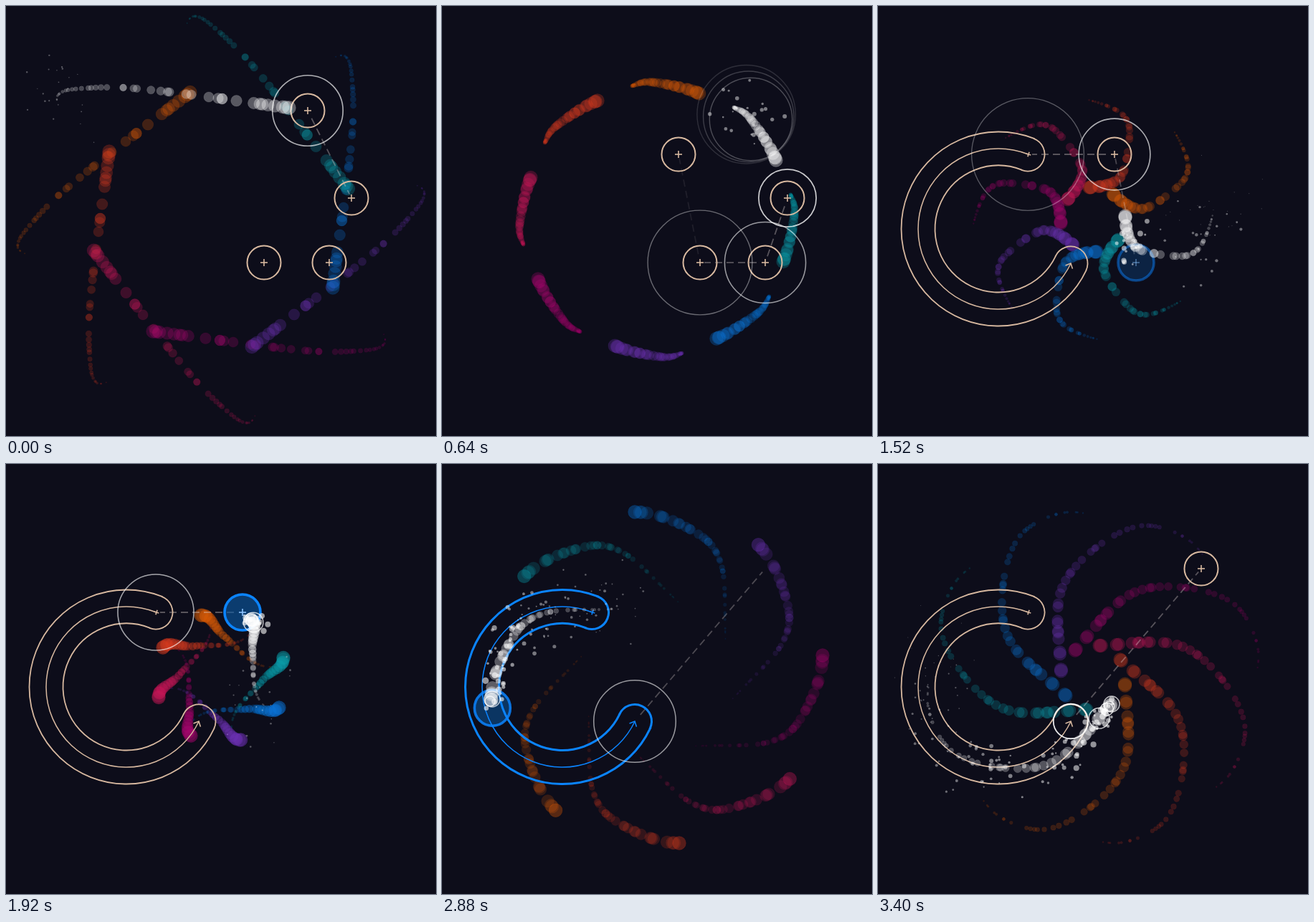
Animation of 600x600 px, one loop 3.44 s. Source, as an HTML page with a canvas:

```html
<!DOCTYPE html>
<html lang="en">
<head>
<meta charset="utf-8">
<title>Eight cursors</title>
<style>
  html, body { margin: 0; width: 100%; height: 100%; overflow: hidden; background: #0d0d1a; }
  canvas { display: block; width: 600px; height: 600px; }
</style>
</head>
<body>
<canvas id="stage" width="600" height="600"></canvas>
<script>
const g = document.getElementById('stage').getContext('2d');
const LOOP = 3440, STEP = 40, TRAIL = 570, R = 23.5, TAU = Math.PI * 2;
const CX = 300, CY = 298;
const BACK = '#0d0d1a', SAND = '#d8b9a0', BLUE = '#0b84ff';
const COLORS = ['#ffffff', '#0aa0ae', '#0a78dc', '#7034b8', '#a8066e', '#cc185a', '#dc3c20', '#dc5c08'];

// key points of the cursor path: time, x, y
const PATH = [
  [-600, 74, 143], [-520, 72, 125], [-430, 95, 116], [-280, 180, 115], [0, 395, 142],
  [200, 408, 142], [405, 431, 158], [640, 466, 215], [850, 472, 263], [1120, 452, 332],
  [1220, 425, 349], [1360, 358, 335], [1640, 344, 262], [1920, 342, 217], [2200, 277, 204],
  [2360, 225, 203], [2520, 144, 208], [2680, 100, 240], [2880, 69, 329], [3000, 100, 398],
  [3120, 175, 424], [3240, 250, 413], [3400, 325, 336], [3450, 340, 318]
];

// places to hit, in order; 5 and 6 are the ends of the slider
const HITS = [
  [421, 146, 405], [482, 268, 902], [451, 358, 1161], [360, 358, 1418],
  [330, 207, 1935], [209, 207, 2385], [269, 359, 3412], [451, 146, 4650]
].map(([x, y, t]) => ({ x, y, t, show: t - 1500, click: t - 50 }));
const HEAD = 5, TAIL = 6;
const ARC = { x: 168, y: 311, r: 112, a0: -1.195, a1: -5.84 };

const clamp = (v, a = 0, b = 1) => Math.max(a, Math.min(b, v));
const mix = (a, b, u) => a + (b - a) * u;
const rand = n => { const s = Math.sin(n * 127.1 + 3.7) * 43758.5453; return s - Math.floor(s); };
const isHeld = t => t >= HITS[HEAD].click && t < HITS[TAIL].click;

// smooth curve through the key points
function cursor(t) {
  const last = PATH.length - 1;
  let i = 0;
  while (i < last - 1 && PATH[i + 1][0] <= t) i++;
  const p = PATH[i], q = PATH[i + 1], o = PATH[Math.max(0, i - 1)], n = PATH[Math.min(last, i + 2)];
  const d = q[0] - p[0], u = clamp((t - p[0]) / d), u2 = u * u, u3 = u2 * u;
  return [1, 2].map(k => {
    const m0 = (q[k] - o[k]) / (q[0] - o[0]) * d, m1 = (n[k] - p[k]) / (n[0] - p[0]) * d;
    return (2 * u3 - 3 * u2 + 1) * p[k] + (u3 - 2 * u2 + u) * m0 + (3 * u2 - 2 * u3) * q[k] + (u3 - u2) * m1;
  });
}

function circle(x, y, r, { fill, stroke, width = 2, alpha = 1, fillAlpha = alpha }) {
  g.beginPath();
  g.arc(x, y, r, 0, TAU);
  if (fill) { g.globalAlpha = fillAlpha; g.fillStyle = fill; g.fill(); }
  if (stroke) { g.globalAlpha = alpha; g.strokeStyle = stroke; g.lineWidth = width; g.stroke(); }
  g.globalAlpha = 1;
}

function line(points, color, width, alpha = 1) {
  g.globalAlpha = alpha;
  g.strokeStyle = color;
  g.lineWidth = width;
  g.beginPath();
  points.forEach(p => g.lineTo(...p));
  g.stroke();
  g.globalAlpha = 1;
}

function cross(x, y, s, color, alpha = 1, turn = 0) {
  for (const a of [turn, turn + Math.PI / 2]) {
    const dx = Math.cos(a) * s, dy = Math.sin(a) * s;
    line([[x - dx, y - dy], [x + dx, y + dy]], color, 1.6, alpha);
  }
}

const lit = (x, y, alpha) =>
  circle(x, y, 25, { fill: '#0b5ca8', stroke: BLUE, width: 3.6, alpha, fillAlpha: alpha * .6 });

// ring that closes in on a place until it is hit
function approach({ x, y, t }, now) {
  const lead = t - now;
  if (lead < 0 || lead > 900) return;
  const alpha = clamp(1.1 - lead / 1150);
  circle(x, y, R + lead * .0635, { stroke: '#fff', width: 1.1 + alpha * .7, alpha: alpha * .9 });
}

function drawNote(n, t) {
  const glow = clamp((n.click + 190 - t) / 80);
  if (t < n.show || !glow) return;
  if (t >= n.click - 15) {
    lit(n.x, n.y, glow);
    cross(n.x, n.y, 5, '#8cc4ff', glow);
    return;
  }
  const alpha = clamp((t - n.show) / 80);
  circle(n.x, n.y, R, { stroke: SAND, alpha });
  cross(n.x, n.y, 5, SAND, alpha);
  approach(n, t);
}

function drawLink(a, b, t) {
  const alpha = clamp((t - a.t + 880) / 400) * clamp((a.t + 200 - t) / 120);
  const turn = Math.atan2(b.y - a.y, b.x - a.x), dx = Math.cos(turn), dy = Math.sin(turn);
  g.setLineDash([10, 6]);
  line([[a.x + dx * 12, a.y + dy * 12], [b.x - dx * 6, b.y - dy * 6]], '#e6dcd8', 1.8, alpha * .34);
  g.setLineDash([]);
}

function drawSlider(t) {
  const { x, y, r, a0, a1 } = ARC, head = HITS[HEAD], tail = HITS[TAIL];
  if (t < head.show) return;
  const held = isHeld(t), color = held ? BLUE : SAND, alpha = clamp((t - head.show) / 80);
  if (held) {
    const a = mix(a0, a1, clamp((t - head.t) / (tail.t - head.t)));
    lit(head.x, head.y, clamp((head.click + 270 - t) / 80));
    lit(x + Math.cos(a) * 102, y + Math.sin(a) * 102, .85);
  }
  g.globalAlpha = alpha;
  g.strokeStyle = color;
  g.lineWidth = held ? 3 : 1.8;
  g.beginPath();
  g.arc(x, y, r + R, a0, a1, true);
  g.arc(tail.x, tail.y, R, a1, a1 + Math.PI, true);
  g.arc(x, y, r - R, a1, a0, false);
  g.arc(head.x, head.y, R, a0 + Math.PI, a0, true);
  g.closePath();
  g.stroke();
  g.lineWidth = 1.5;
  g.beginPath();
  g.arc(x, y, r, a0, a1, true);
  g.stroke();
  const back = a1 + Math.PI / 2;
  const barb = s => [tail.x + Math.cos(back + s) * 8, tail.y + Math.sin(back + s) * 8];
  line([barb(.75), [tail.x, tail.y], barb(-.75)], color, 1.6, alpha);
  cross(head.x + 1, head.y, 3.5, color, alpha, .3);
  if (!held) approach(head, t);
  approach(tail, t);
}

// dots left along the path, shrinking and fading with age
function trailDots(t) {
  const gap = 15, dots = [];
  for (let k = Math.ceil((t - TRAIL) / gap); k * gap <= t; k++) {
    const born = Math.min(t, k * gap + (rand(k) - .5) * 26);
    const left = clamp(1 - (t - born) / TRAIL);
    dots.push([...cursor(born), .8 + 8.6 * left, left]);
  }
  dots.push([...cursor(t), 9.4, 1]);
  return dots;
}

function drawTrail(dots, color, strength) {
  for (const [x, y, r, left] of dots) {
    const alpha = strength * (.6 + .4 * left);
    circle(x, y, r, { fill: color, stroke: color, width: .7, alpha: alpha * .55, fillAlpha: alpha });
  }
}

// sparks: a burst on each hit, a steady stream along the slider
const sparks = [];
function addSpark(born, reach) {
  const n = sparks.length * 5 + 1, [x, y] = cursor(born);
  sparks.push({
    born, x: x + (rand(n) - .5) * 28, y: y + (rand(n + 1) - .5) * 28,
    a: rand(n + 2) * TAU, d: reach * (.15 + rand(n + 3)), r: .8 + 3.6 * rand(n + 4)
  });
}
for (const born of [-TRAIL, ...HITS.map(h => h.click)])
  if (born < LOOP) for (let i = 0; i < 20; i++) addSpark(born + i, 65);
for (let t = HITS[HEAD].t; t < LOOP; t += 6) addSpark(t, 55);

function drawSparks(t) {
  for (const s of sparks) {
    const p = (t - s.born) / 680;
    if (p < 0 || p >= 1) continue;
    const d = s.d * (1 - (1 - p) ** 2);
    circle(s.x + Math.cos(s.a) * d, s.y + Math.sin(s.a) * d, .5 + s.r * (1 - p),
      { fill: '#fff', alpha: .6 * (1 - p * .6) });
  }
}

// every other click sends out three rings
function drawRipples(t) {
  HITS.forEach(({ click }, n) => {
    for (let i = 0; i < 3 && n % 2 === 0; i++) {
      const start = click + i * 25, age = t - start;
      if (age < 0 || age > 340) continue;
      circle(...cursor(start), 6 + age * .22, { stroke: '#fff', width: 1.4, alpha: .85 * (1 - age / 340) });
    }
  });
  if (t > HITS[HEAD].click) {
    const [x, y] = cursor(t);
    circle(x + 1, y - 1, 11, { stroke: '#fff', width: 1.5, alpha: .7 });
    circle(x - 2, y + 2, 7, { stroke: '#fff', width: 1.5, alpha: .7 });
  }
}

function draw(t) {
  g.fillStyle = BACK;
  g.fillRect(0, 0, 600, 600);
  const dots = trailDots(t), strength = isHeld(t) ? .2 : .28;
  for (let k = 7; k > 0; k--) {
    const c = Math.cos(k * TAU / 8), s = Math.sin(k * TAU / 8);
    const turned = dots.map(([x, y, ...rest]) =>
      [CX + (x - CX) * c - (y - CY) * s, CY + (x - CX) * s + (y - CY) * c, ...rest]);
    drawTrail(turned, COLORS[k], strength);
  }
  HITS.forEach((h, i) => { if (i < TAIL + 1 && i !== HEAD) drawLink(h, HITS[i + 1], t); });
  drawSlider(t);
  HITS.forEach((h, i) => { if (i !== HEAD && i !== TAIL) drawNote(h, t); });
  drawTrail(dots, COLORS[0], .34);
  drawSparks(t);
  drawRipples(t);
}

const begin = performance.now();
function tick() {
  const t = (performance.now() - begin) % LOOP;
  draw(Math.floor(t / STEP) * STEP);
  requestAnimationFrame(tick);
}
tick();
</script>
</body>
</html>
```
